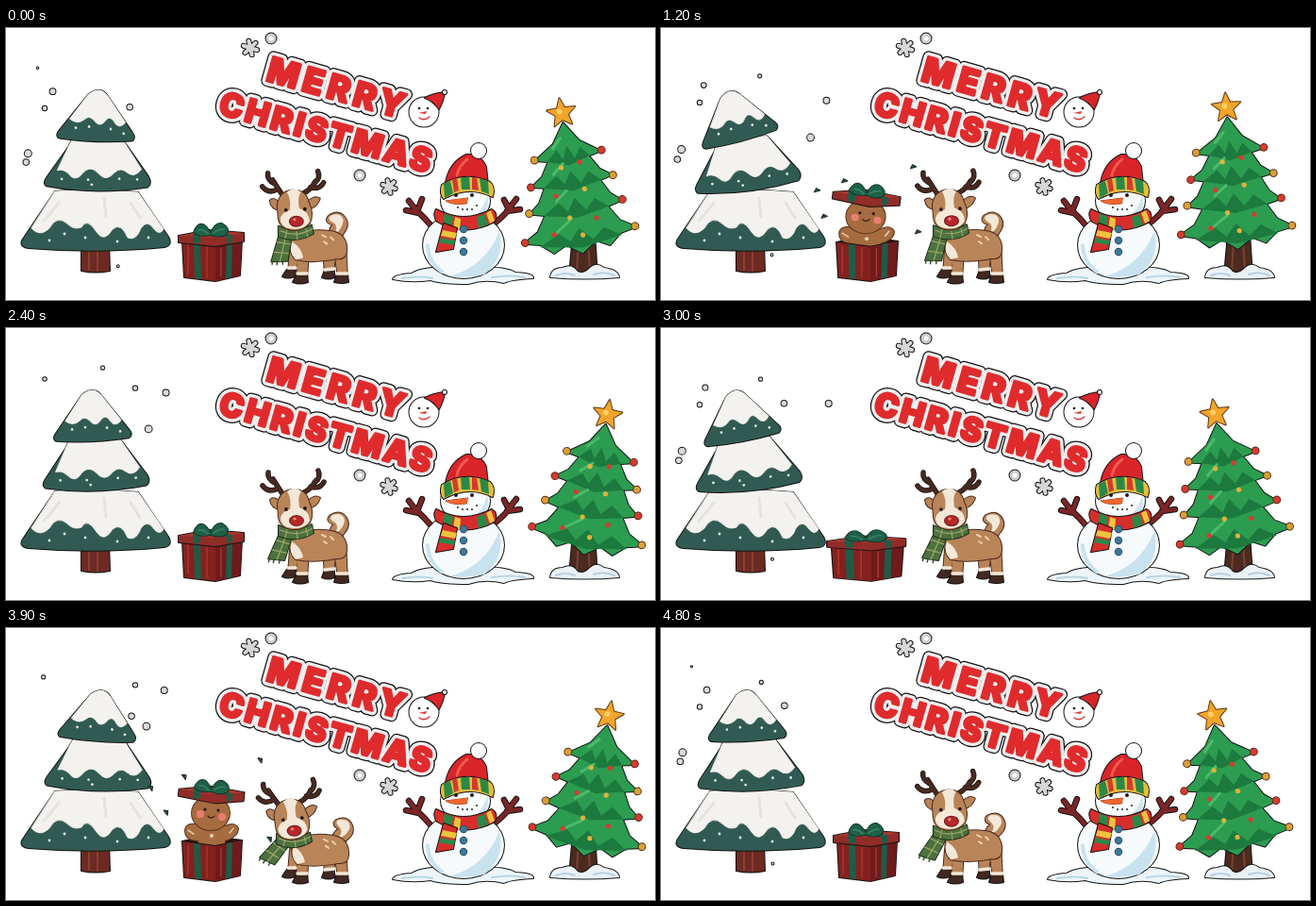
Write an HTML page with a canvas that moves like this. It is 688 px wide and 288 px high and loops after 4.9 s.

```html
<!DOCTYPE html>
<html lang="en">
<head>
<meta charset="utf-8">
<title>Merry Christmas</title>
<style>
html, body { margin: 0; width: 100%; height: 100%; overflow: hidden; background: #fff; }
canvas { display: block; }
</style>
</head>
<body>
<canvas id="stage" width="688" height="288"></canvas>
<script>
const g = document.getElementById('stage').getContext('2d');
const LOOP = 4.9, TAU = Math.PI * 2, INK = '#141414';
const wave = (t, n, phase) => Math.sin(TAU * n * t / LOOP + phase);
g.lineJoin = g.lineCap = 'round';

function draw(d, fill, line, width = 2) {
  const p = new Path2D(d);
  if (line) { g.strokeStyle = line; g.lineWidth = width; g.stroke(p); }
  if (fill) { g.fillStyle = fill; g.fill(p); }
}
function disc(x, y, r, fill, line, ry = r) {
  g.beginPath();
  g.ellipse(x, y, r, ry, 0, 0, TAU);
  if (line) { g.strokeStyle = line; g.lineWidth = 2; g.stroke(); }
  g.fillStyle = fill;
  g.fill();
}
// Paint a part turned and scaled about a pivot, then moved.
function pose(px, py, { a = 0, dx = 0, dy = 0, sx = 1, sy = 1 }, paint) {
  g.save();
  g.translate(px + dx, py + dy);
  g.rotate(a);
  g.scale(sx, sy);
  g.translate(-px, -py);
  paint();
  g.restore();
}
function key(u, stops) {
  const i = stops.findIndex(s => s[0] > u);
  if (i < 0) return stops[stops.length - 1][1];
  const [t0, v0] = stops[i - 1], [t1, v1] = stops[i];
  return v0 + (v1 - v0) * (u - t0) / (t1 - t0);
}

// Snowy tree: the upper tiers lean with the wind.
const PINE = '#315b52', SNOW = '#f4f2ef';
function tier(shape, snow, dots) {
  draw(shape, PINE, INK);
  draw(snow, SNOW, '#dcd9d5', 1);
  dots.forEach(([x, y]) => disc(x, y, 1.4, '#dfe8e4'));
}
function snowyTree(t) {
  const s = wave(t, 3, .28);
  draw('M80 228H109L110 257Q95 260 80 257Z', '#6c2a22', INK);
  draw('M88 234V256M97 235V257', null, '#8a3f31', 2);
  tier('M52 173Q95 170 140 174L172 221Q177 230 168 232Q95 239 24 233Q12 231 19 222Z',
    'M52 173Q95 170 140 174L167 213Q163 220 157 213Q150 202 143 212Q138 226 129 222Q122 205 113 213Q104 228 96 216Q86 200 80 211Q72 214 66 208Q54 197 46 212Q36 222 27 212Z',
    [[62, 218], [84, 222], [46, 225], [118, 226], [151, 222]]);
  draw('M56 185Q48 196 40 204M104 180L106 200M132 185L142 201', null, '#e6e3df', 3);
  pose(96, 160, { a: s * .11, dx: s * 4 }, () => tier(
    'M70 118Q95 115 121 117L150 156Q154 163 149 167Q95 177 42 169Q38 166 42 160L64 127Q67 119 70 118Z',
    'M70 118Q95 115 121 117L142 148Q135 158 127 152Q120 146 113 153Q105 163 97 154Q88 145 80 154Q73 164 66 156Q60 150 53 152L64 127Q67 119 70 118Z',
    [[58, 161], [86, 161], [90, 166], [119, 159], [138, 159]]));
  pose(93, 110, { a: s * .24, dx: s * 10 }, () => tier(
    'M93 66Q99 66 103 72L131 108Q136 114 131 117Q93 122 54 119Q50 117 53 112L82 71Q88 66 93 66Z',
    'M93 66Q98 66 103 72L123 98Q117 106 112 99Q107 91 102 97Q96 106 90 98Q84 92 79 98Q72 104 64 98L82 71Q88 66 93 66Z',
    [[71, 107], [85, 105], [108, 106], [122, 110]]));
}

// Falling flakes: start, end, x, y, speed x, speed y, radius, growth.
const FALL = LOOP / 3;
const flakes = [
  [1.48, 3.53, 32, 40, 9.8, 15.2, 1.6, 1.3], [.85, 1.9, 41, 74, 0, 14, 3.2, 0],
  [.66, 1.6, 102, 40, 5, 20, 2.6, 0], [.58, .95, 137, 59, 0, 25, 3.2, 0],
  [1.25, 2.3, 130, 78, 3, 15, 3.8, 0], [.58, 1.45, 167, 65, 13.6, 19, 4, 0],
  [.58, 1.3, 148, 103, 17, 21, 4.4, 0], [1.05, 1.8, 21, 127, 4, 10, 4.5, 0],
  [1.05, 1.8, 16, 138, 9, 7, 3.8, 0], [1.05, 1.7, 117, 236, 3, 28, 2, 0]
];
function snowfall(t) {
  for (const [from, to, x, y, vx, vy, r, grow] of flakes)
    for (let v = t % FALL; v < to; v += FALL) {
      const age = v - from;
      if (age >= 0) disc(x + vx * age, y + vy * age, r + grow * age - 1, '#d9d9d9', INK);
    }
}

// Gift box with a gingerbread figure that pops out under the lid.
const shards = [[178, 209, -11, -19], [262, 162, 10, -30], [188, 178, -46, -12], [204, 172, -20, -20], [257, 202, 30, 28]];
function gingerbread() {
  const dough = '#a66c40', edge = '#5b321d';
  draw('M202 205Q191 203 190 211Q190 222 204 222L203 262H233L232 222Q246 218 246 209Q242 202 232 207Z', dough, edge);
  disc(217, 193, 20, dough, edge, 18);
  disc(206, 194, 4, '#e77f70');
  disc(229, 197, 4, '#e77f70');
  disc(211, 189, 1.6, '#2b1710');
  disc(225, 190, 1.6, '#2b1710');
  draw('M214 196Q217 200 221 196', null, '#44231a', 1.4);
  draw('M193 211L199 215M241 209L237 214', null, '#ead2b5', 1.4);
  disc(218, 217, 2, '#ead2b5');
}
function lid() {
  draw('M183 220L215 214 252 217V226L222 231 183 227Z', '#912c28', INK);
  draw('M183 220L215 214 252 217 222 222Z', '#a5382f');
  draw('M198 218L208 216 240 219 240 227 234 228 234 221 206 219 206 228 199 228Z', '#1f5c46');
  draw('M217 219Q204 222 199 216Q203 206 209 208Q213 210 217 217Q222 205 229 207Q238 212 234 218Q227 223 217 219Z', '#1e6048', '#0d2c20', 1.6);
  draw('M204 214Q209 213 214 218M231 213Q225 213 220 217', null, '#3c8467', 1.5);
}
function gift(t) {
  const u = t % (LOOP / 2);
  const rise = key(u, [[0, 0], [.56, 0], [.7, 1], [.95, .92], [1.2, .9], [1.45, .94], [1.9, 1], [2.08, .9], [2.28, 0]]);
  const wide = key(u, [[0, 1], [.3, 1], [.55, 1.2], [.7, .95], [.85, 1], [1.2, 1.03], [1.45, 1], [1.9, .9], [2.15, 1.05], [2.35, 1]]);
  const tilt = rise * (.05 + .09 * Math.cos(u * 5));
  pose(217, 268, { sx: wide, sy: wide ** -.7 }, () => {
    if (rise) {
      draw('M187 226L215 220 250 225 222 231Z', '#35110f', INK);
      g.save();
      g.beginPath();
      g.rect(150, 120, 140, 125);
      g.clip();
      pose(217, 230, { dy: (1 - rise) * 52 }, gingerbread);
      g.restore();
    }
    draw('M187 226L222 231 250 225 248 262 222 268 189 264Z', '#84211f', INK);
    draw('M222 231L250 225 248 262 222 268Z', '#701a1b');
    draw('M199 228L206 229 207 266 200 265ZM234 228L240 227 239 264 233 265Z', '#1f5c46');
    draw('M193 230V260M213 232V264M228 233V263', null, '#a53b32', 1.3);
    pose(217, 224, { a: tilt, dy: -rise * 49 }, lid);
  });
  if (u > .65 && u < 1.46) for (const [x, y, vx, vy] of shards) {
    const age = u - .7;
    pose(x, y, { a: age * 5, dx: vx * age, dy: vy * age },
      () => draw(`M${x - 3} ${y - 2}L${x + 3} ${y}L${x - 1} ${y + 2}Z`, '#254d42', INK, 1.2));
  }
}

// Reindeer: nodding head, swinging scarf, wagging tail.
const TAN = '#b98457', CREAM = '#f3e8d8', BARK = '#49291f';
function deerHead() {
  const horns = 'M294 177Q288 168 283 160M288 170Q278 175 272 167M285 164Q277 160 278 153M316 174Q324 170 328 162M323 168Q333 171 337 163M328 163Q334 158 331 151';
  draw(horns, null, INK, 5.5);
  draw(horns, null, BARK, 4);
  draw('M292 186Q284 177 280 182Q281 191 291 192ZM320 183Q328 176 333 180Q330 189 321 191Z', TAN, BARK);
  draw('M288 187Q290 173 303 171Q318 170 321 184Q327 196 322 206Q314 214 303 213Q290 211 289 200Z', TAN, BARK);
  draw('M298 173Q306 166 313 173Q309 178 311 190Q322 194 322 204Q317 213 304 212Q291 211 291 201Q293 194 301 192Q303 181 298 173Z', CREAM);
  disc(308, 204, 7, '#b7272b', '#6d1518', 5);
  disc(306, 202, 1.6, '#f08a80');
  disc(297, 192, 1.9, '#23130f');
  disc(317, 191, 1.9, '#23130f');
}
function deer(t) {
  const dip = .5 + .5 * wave(t - .254, 8, Math.PI / 2);
  const wag = .5 + .5 * wave(t - .35, 8, Math.PI / 2);
  const body = { dx: dip * 2, dy: dip * 5 };
  pose(348, 222, { ...body, a: wag * .5 }, () => {
    draw('M345 222Q340 214 346 208Q336 206 341 199Q350 192 357 198Q365 206 358 216Q355 223 350 225Z', TAN, BARK);
    draw('M349 215Q352 208 345 205Q339 202 344 198Q355 194 357 203Q357 209 352 215Z', CREAM);
  });
  draw('M336 232L338 262H347L349 242 352 266H362L360 227ZM301 234L299 260H307L309 246 308 266H319L321 236Z', TAN, BARK);
  pose(330, 246, body, () => {
    draw('M303 221Q320 211 345 215Q362 218 361 236Q360 245 350 244Q325 249 307 245Q298 236 303 221Z', TAN, BARK);
    draw('M303 226Q313 232 315 243L307 245Q299 238 303 226Z', CREAM);
    draw('M335 219L339 221M344 221L347 224M337 226L340 228', null, '#ead0b0', 2);
  });
  draw('M338 256L348 255 348 264Q342 267 335 264ZM351 260L362 260 363 269Q356 271 348 269ZM299 254L307 254 306 263Q299 266 293 263ZM309 260L319 260 320 269Q312 272 304 269Z', '#412820', INK);
  draw('M338 256L348 255M351 260H362M299 254H307M309 260H319', null, CREAM, 3.5);
  const lean = { dx: -dip * 2, dy: dip * 11 };
  pose(298, 220, { ...lean, a: .05 + wag * .8, dy: dip * 7 }, () => {
    draw('M290 217L303 219 301 246 284 248Z', '#4d713f', '#1c2c18');
    draw('M288 227L302 228M286 238L301 238M297 219L293 247', null, '#9aa667', 1.3);
    draw('M285 248V251M290 248V251M296 247V250', null, '#35502c', 1.5);
  });
  pose(306, 216, { ...lean, dy: dip * 9 }, () => {
    draw('M289 209Q306 218 324 208L326 217Q308 228 289 220Z', '#4d713f', '#1c2c18');
    draw('M291 214Q308 222 325 212M298 213L296 222M308 215L309 223M318 212L320 220', null, '#9aa667', 1.2);
  });
  pose(306, 212, { ...lean, a: -dip * .06 }, deerHead);
}

// Lettering and the ornaments around it.
function words(text, x, y, size, space) {
  g.save();
  g.translate(x, y);
  g.rotate(.275);
  g.font = `800 ${size}px Inter, "Open Sans", sans-serif`;
  g.letterSpacing = space + 'px';
  g.textAlign = 'center';
  for (const [color, width] of [[INK, 12.5], ['#eee', 10], ['#e02b2d', 3.2]]) {
    g.strokeStyle = color;
    g.lineWidth = width;
    g.strokeText(text, space / 2, size * .36);
  }
  g.fillStyle = '#e02b2d';
  g.fillText(text, space / 2, size * .36);
  g.restore();
}
function star(x, y, r) {
  let d = '';
  for (let i = 0; i < 3; i++) {
    const a = i * TAU / 6 + .3, c = r * Math.cos(a), s = r * Math.sin(a);
    d += `M${x - c} ${y - s}L${x + c} ${y + s}`;
  }
  draw(d, null, INK, 6);
  draw(d, null, '#d6d6d6', 4);
}
function banner() {
  words('CHRISTMAS', 339, 110, 34, 3);
  words('MERRY', 350, 63, 36, 5);
  star(259, 21, 7.5);
  star(406, 168, 7);
  disc(281, 11, 5.5, '#ccc', INK);
  disc(281, 11, 2.5, '#fff');
  disc(375, 156, 5.5, '#ccc', INK);
  disc(375, 156, 2.5, '#fff');
  disc(443, 89, 15.5, '#fff', INK);
  draw('M444 74Q454 69 465 68Q464 77 459 86Q453 77 444 74Z', '#d8262a', INK);
  disc(465, 68, 2, '#eee', INK);
  disc(438, 85, 1.3, INK);
  disc(447, 85, 1.3, INK);
  draw('M446 88L437 90 445 91Z', '#e33a30');
  draw('M438 95Q443 99 449 94', null, '#d33', 1.4);
}

function snowman() {
  draw('M410 266Q412 261 430 260Q440 252 485 253Q532 252 540 259Q560 260 559 265Q535 266 528 270Q508 265 490 271Q462 271 450 267Q430 270 410 266Z', '#edf5fa', INK);
  draw('M420 265Q440 262 452 265M515 264Q535 261 550 264', null, '#b5d4e6', 2);
  const arms = 'M453 212Q444 201 433 191M438 196L424 193M434 192L427 183M436 194L441 181M516 208Q526 201 535 190M531 194L545 192M534 190L541 181M533 192L528 182';
  draw(arms, null, INK, 6.5);
  draw(arms, null, '#7b2526', 4.5);
  disc(485, 230, 43, '#f6fafc', INK, 35);
  draw('M523 215Q530 243 507 261Q490 265 470 263Q508 253 523 215Z', '#c9e2f0');
  draw('M447 230Q448 248 462 258', null, '#c9e2f0', 4);
  disc(487, 183, 26, '#fafcfd', INK, 22);
  draw('M510 177Q514 192 503 200L492 203Q506 194 510 177Z', '#cfe5f0');
  draw('M466 164Q470 142 488 134Q503 133 509 147L511 166Z', '#d9252a', INK);
  draw('M478 156Q480 146 489 139', null, '#f0594f', 3);
  disc(501, 130, 8, '#fbfbfb', INK);
  draw('M462 166Q486 151 513 163Q519 168 516 179Q490 166 464 181Q459 175 462 166Z', '#e5bd3c', INK);
  draw('M464 165L471 162 474 175 465 180ZM482 158L491 158 492 171 483 171ZM502 159L511 162 512 176 504 173Z', '#2c8846');
  draw('M473 161L478 159 480 172 475 174ZM494 158L499 158 501 172 494 171Z', '#d33b30');
  disc(477, 177, 2, '#1c1c1c');
  disc(494, 177, 2, '#1c1c1c');
  draw('M489 180L466 183Q473 188 488 186Z', '#ee662e', '#a63a19', 1);
  for (let i = 0; i < 5; i++) disc(479 + i * 5, 190 + (i % 4 ? 2 : 0) - (i === 4 ? 2 : 0), 1.1, '#333');
  draw('M456 192Q485 208 515 192Q522 196 518 205Q486 222 457 205Q452 198 456 192Z', '#d72e2c', INK);
  draw('M465 196L474 200 472 212 463 208ZM499 200L507 197 511 208 501 212Z', '#2c8846');
  draw('M476 200L482 202 481 214 474 212ZM509 196L514 193 518 204 513 207Z', '#ecc33e');
  draw('M464 207L478 212 474 234 456 237Z', '#d72e2c', INK);
  draw('M463 214L478 217 476 223 461 220Z', '#ecc33e');
  draw('M461 222L476 225 475 230 459 227Z', '#2c8846');
  for (const y of [213, 225, 237]) disc(485, y, 3.2, '#3f7898', '#28506a');
}

// Decorated tree: one half of the outline, mirrored about x = 612.
const half = [[0, 92], [14, 113], [36, 128], [22, 131], [31, 146], [44, 155], [30, 158], [38, 173], [50, 183],
  [34, 187], [44, 203], [61, 213], [43, 217], [30, 228], [16, 221], [0, 232]];
const outline = [...half, ...half.map(([x, y]) => [-x, y]).reverse()];
const bulbs = [[36, 127], [44, 155], [50, 182], [59, 212]];
function greens() {
  draw('M' + outline.map(([x, y]) => `${612 + x} ${y}`).join('L') + 'Z', '#2c9c50', INK);
  for (const [y, w] of [[128, 23], [155, 31], [184, 35], [216, 44]]) {
    draw(`M${612 - w} ${y + 3}L${612 - w * .5} ${y - 8}L${612 - w * .25} ${y + 2}L612 ${y - 11}L${612 + w * .3} ${y + 3}L${612 + w * .6} ${y - 8}L${612 + w} ${y + 3}L612 ${y + 10}Z`, '#1c7a3e');
    draw(`M${606 - w * .4} ${y - 10}L${610 - w * .15} ${y - 20}`, null, '#4dba68', 3);
  }
  bulbs.forEach(([x, y], i) => {
    disc(612 - x, y, 3.4, i % 2 ? '#d63a32' : '#d8a036', '#5a2a18');
    disc(612 + x, y, 3.4, i % 2 ? '#d8a036' : '#d63a32', '#5a2a18');
  });
  for (const [x, y, c] of [[603, 139, '#e0b23c'], [623, 136, '#d63a32'], [593, 168, '#d63a32'], [624, 165, '#e0b23c'], [604, 193, '#e0b23c'], [632, 197, '#d63a32'], [585, 208, '#d63a32'], [615, 213, '#e0b23c']])
    disc(x, y, 2.6, c);
  let d = '';
  for (let i = 0; i < 10; i++) {
    const a = i * TAU / 10 - TAU / 4, r = i % 2 ? 7 : 16;
    d += `${i ? 'L' : 'M'}${612 + r * Math.cos(a)} ${82 + r * Math.sin(a)}`;
  }
  draw(d + 'Z', '#f2a52b', '#5d3511');
  disc(610, 80, 3, '#ffd063');
}
function greenTree(t) {
  const s = wave(t, 3, -1);
  draw('M601 218H624L627 262H597Z', '#4c2a20', INK);
  draw('M607 225L605 258M617 225L619 258', null, '#754432', 2);
  draw('M577 264Q578 254 590 254Q600 249 606 258Q612 261 618 255Q626 247 634 254Q649 256 650 264Q613 267 577 264Z', '#eaf2f8', INK);
  draw('M583 262Q593 258 603 262M623 261Q634 257 645 262', null, '#b8cfe2', 2);
  pose(612, 235, { a: s * .18, dy: s * s * 9 }, greens);
}

function frame(now) {
  const t = Math.floor(now % (LOOP * 1000) / 100) / 10;
  g.clearRect(0, 0, 688, 288);
  snowyTree(t);
  snowfall(t);
  gift(t);
  deer(t);
  banner();
  snowman();
  greenTree(t);
  requestAnimationFrame(frame);
}
requestAnimationFrame(frame);
</script>
</body>
</html>
```
